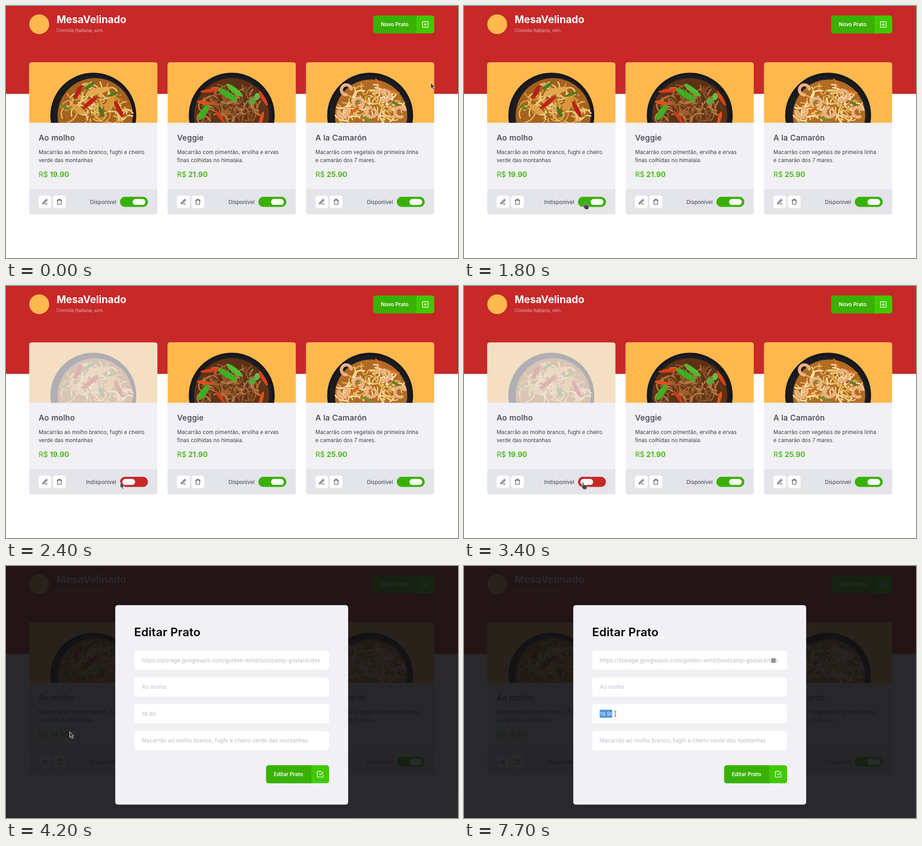
An HTML page for the animation above (8000 ms loop, 1000 by 560 pixels).

```html
<!DOCTYPE html>
<html lang="pt">
<head>
<meta charset="utf-8">
<title>Pratos</title>
<style>
html, body { margin: 0; width: 100%; height: 100%; overflow: hidden; background: #fff; }
svg { display: block; width: 100vw; height: 100vh; }
text { font: 400 11.6px Inter, "Open Sans", sans-serif; letter-spacing: .009em; fill: #3d3d4d; white-space: pre; }
.brand { font-size: 22.4px; font-weight: 700; letter-spacing: 0; fill: #fff; }
.tagline { font: 400 11.2px Roboto, sans-serif; letter-spacing: 0; fill: #fff; opacity: .6; }
.name { font-size: 17.4px; font-weight: 500; letter-spacing: .012em; }
.price { font-size: 16.2px; fill: #39b100; letter-spacing: 0; }
.strong { font-weight: 600; }
.action { font-size: 11.5px; font-weight: 600; fill: #fff; letter-spacing: 0; }
.heading { font-size: 25.6px; font-weight: 600; fill: #000; }
.field { fill: #b7b7cc; letter-spacing: .024em; }
.icon { fill: none; stroke: #3d3d4d; stroke-width: 2; stroke-linecap: round; stroke-linejoin: round; }
.light { stroke: #fff; }
</style>
</head>
<body>
<svg id="stage" viewBox="0 0 1000 560" preserveAspectRatio="none"></svg>
<script>
const LOOP = 8000, STEP = 100;
const GREEN = [57, 177, 0], RED = [199, 40, 40];
const CARD_W = 283.8, CARD_H = 338, PHOTO_H = 134.4, FIELD_YS = [188, 247.7, 307, 366.4];

const icons = {
  plus: '<rect x="3" y="3" width="18" height="18" rx="2"/><path d="M12 8v8M8 12h8"/>',
  check: '<path d="M9 11l3 3L22 4M21 12v7a2 2 0 0 1-2 2H5a2 2 0 0 1-2-2V5a2 2 0 0 1 2-2h11"/>',
  edit: '<path d="M12 20h9M16.5 3.5a2.1 2.1 0 0 1 3 3L7 19l-4 1 1-4z"/>',
  trash: '<path d="M3 6h18M19 6v14a2 2 0 0 1-2 2H7a2 2 0 0 1-2-2V6M8 6V4a2 2 0 0 1 2-2h4a2 2 0 0 1 2 2v2"/>'
};

// Toppings: [x, y, rx, ry, rotation, colour], relative to the plate centre.
const dishes = [
  {
    name: 'Ao molho', price: '19.90', seed: 5, x: 4, r: 83,
    lines: ['Macarrão ao molho branco, fughi e cheiro', 'verde das montanhas'],
    noodles: ['#d89a3c', '#f0cc80', '#a4621e', '#e4b05a'],
    toppings: [
      [-38, -52, 18, 5, -62, '#b8201a'], [-12, -28, 22, 5, -40, '#c4241a'], [52, -14, 20, 5, 62, '#b8201a'],
      [6, -54, 28, 7, -14, '#e2a94e'], [32, -28, 19, 7, -55, '#d9963a'], [-38, -14, 17, 7, 35, '#dba045'],
      [-12, -66, 14, 4, -35, '#4a7d22'], [14, -8, 13, 4, 65, '#3f7a1e'], [-66, -18, 11, 3, 30, '#568a2c'],
      [40, -47, 15, 3, -20, '#4a7d22']
    ]
  },
  {
    name: 'Veggie', price: '21.90', seed: 11, x: 0, r: 83,
    lines: ['Macarrão com pimentão, ervilha e ervas', 'finas colhidas no himalaia.'],
    noodles: ['#8a5128', '#b87a44', '#5e3216', '#a3632f'],
    toppings: [
      [-44, -56, 26, 4, -8, '#d9401a'], [-60, -28, 18, 4, 10, '#e2501c'], [70, -38, 19, 4, 60, '#dc421a'],
      [-25, 4, 18, 4, 55, '#cf3b18'], [66, 6, 15, 4, -75, '#e2501c'],
      [-9, -46, 25, 7, 32, '#3fae22'], [6, -56, 22, 6, 38, '#52bb30'], [-62, -7, 20, 7, -58, '#3fae22'],
      [45, -32, 9, 7, -30, '#5aa83c'], [56, -42, 6, 8, 10, '#6ab84a']
    ]
  },
  {
    name: 'A la Camarón', price: '25.90', seed: 23, x: 2, r: 80,
    lines: ['Macarrão com vegetais de primeira linha', 'e camarão dos 7 mares.'],
    noodles: ['#e3ac50', '#f9e4ae', '#b06c24', '#f2cc80'],
    toppings: [
      [18, -70, 15, 3, 55, '#d9681c'], [46, -53, 18, 3, 10, '#e0741c'], [-38, -10, 15, 3, -45, '#d9681c'],
      [-25, -34, 13, 3, -30, '#73852a'], [55, -26, 13, 3, 30, '#5f7d26'], [-9, 8, 14, 3, 25, '#7a8c30']
    ],
    shrimp: [[-55, -58], [-27, -28], [32, -44], [-62, -6], [0, -7], [63, -8]]
  }
];

// Pointer path: [ms, x, y]
const path = [
  [0, 939.5, 170.5], [100, 952, 176], [900, 217, 351], [1000, 218, 354], [1400, 266, 437], [2000, 266, 437],
  [2400, 253, 436], [3300, 253, 436], [3400, 262, 437], [3600, 262, 437], [4000, 91, 431], [4100, 89, 429],
  [4200, 141, 368], [4300, 168, 309], [4400, 168, 309], [5300, 691, 210], [5400, 338, 268], [5500, 338, 268],
  [5600, 357, 207], [5700, 335, 268], [5800, 335, 268], [6000, 350, 274], [6100, 342, 291], [6500, 322, 329],
  [6600, 322, 329], [6900, 333, 340], [7000, 333, 340], [7500, 333.5, 329], [7600, 333.5, 329], [7700, 334.5, 328.5]
];

const rect = (x, y, w, h, r, fill, extra = '') =>
  `<rect x="${x}" y="${y}" width="${w}" height="${h}" rx="${r}" fill="${fill}" ${extra}/>`;
const text = (x, y, str, cls = '', extra = '') => `<text x="${x}" y="${y}" class="${cls}" ${extra}>${str}</text>`;
const icon = (name, cx, cy, size, cls = '') =>
  `<g class="icon ${cls}" transform="translate(${cx - size / 2} ${cy - size / 2}) scale(${size / 24})">${icons[name]}</g>`;

function random(seed) {
  return () => (seed = (seed * 16807) % 2147483647) / 2147483647;
}

function actionButton(x, y, w, label, glyph) {
  const split = x + w - 39.3;
  return rect(x, y, w, 40, 5.6, '#41c900') +
    `<path d="M${split} ${y}H${x + 5.6}a5.6 5.6 0 0 0 -5.6 5.6v28.8a5.6 5.6 0 0 0 5.6 5.6H${split}z" fill="#39b100"/>` +
    text(x + 16.8, y + 24, label, 'action') + icon(glyph, split + 19.6, y + 20, 16.8, 'light');
}

function food(dish) {
  const next = random(dish.seed * 7919);
  let out = '<circle r="95" fill="#17171b"/><circle r="90" fill="#1d1c21"/>' +
    `<g transform="translate(${dish.x} 0)"><circle r="${dish.r}" fill="${dish.noodles[2]}"/>`;
  for (let i = 0; i < 110; i++) {
    const angle = Math.PI * (1 + next()), dist = dish.r * 0.88 * Math.sqrt(next());
    const turn = next() * 360, bend = 8 + next() * 14;
    out += `<path d="M-15 0Q0 ${-bend} 15 0" fill="none" stroke="${dish.noodles[i % 4]}" stroke-width="3" stroke-linecap="round"
      transform="translate(${dist * Math.cos(angle)} ${dist * Math.sin(angle) + 8}) rotate(${turn})"/>`;
  }
  for (const [x, y, rx, ry, turn, fill] of dish.toppings)
    out += `<ellipse rx="${rx}" ry="${ry}" fill="${fill}" transform="translate(${x} ${y}) rotate(${turn})"/>`;
  (dish.shrimp || []).forEach(([x, y], i) => {
    out += `<path d="M-9 8A11 11 0 1 1 8 8" fill="none" stroke="#eeb083" stroke-width="7" stroke-linecap="round"
      transform="translate(${x} ${y}) rotate(${i * 67 - 50})"/>`;
  });
  return out + '</g>';
}

function card(dish, i) {
  return `<g transform="translate(${51.2 + i * 306.2} 125.2)"><g clip-path="url(#card)">
    ${rect(0, 0, CARD_W, CARD_H, 0, '#f0f0f5')}
    <g id="photo${i}">${rect(0, 0, CARD_W, PHOTO_H, 0, '#ffb84d')}<g transform="translate(142 118)">${food(dish)}</g></g>
    ${rect(0, PHOTO_H, CARD_W, 148, 0, '#f0f0f5')}${rect(0, 282, CARD_W, 56, 0, '#e4e4eb')}</g>
    ${text(21, 174, dish.name, 'name')}
    ${dish.lines.map((line, n) => text(21, 204 + n * 17.6, line)).join('')}
    ${text(21, 255, 'R$', 'price')}${text(45.8, 255, dish.price, 'price strong')}
    ${rect(21, 296, 28, 28, 5.6, '#fff')}${icon('edit', 35, 310, 14)}
    ${rect(53, 296, 28, 28, 5.6, '#fff')}${icon('trash', 67, 310, 14)}
    ${text(192.8, 314.5, 'Disponível', '', `id="status${i}" text-anchor="end"`)}
    ${rect(201, 298.9, 61.8, 22.5, 11.25, `rgb(${GREEN})`, `id="track${i}"`)}
    ${rect(229, 303.5, 28.2, 13.4, 6.7, '#fff', `id="thumb${i}"`)}</g>`;
}

function modal() {
  const values = ['https://storage.googleapis.com/golden-wind/bootcamp-gostack/des', dishes[0].name,
    dishes[0].price, dishes[0].lines.join(' ')];
  return `<g id="modal">${rect(0, 0, 1000, 560, 0, '#121214', 'fill-opacity=".9"')}
    ${rect(241.7, 87, 515.3, 443.2, 5.6, '#f0f0f5')}${text(283.5, 156, 'Editar Prato', 'heading')}
    ${FIELD_YS.map(y => rect(283.6, y, 431.2, 42.6, 5.6, '#fff')).join('')}
    ${rect(300.3, 319.5, 27.7, 17.5, 0, '#4a90d9', 'id="selection"')}
    ${values.map((value, i) => text(300.5, FIELD_YS[i] + 25.6, value, 'field', `id="value${i}"`)).join('')}
    ${rect(329, 261, 1, 16, 0, '#85859a', 'id="caret"')}
    <g id="filler">${rect(680.5, 205, 8.6, 10, 1.5, '#77777f')}
      <path d="M682.5 207.5h4.6M682.5 210h4.6M682.5 212.5h4.6" stroke="#d8d8de"/></g>
    ${actionButton(575.6, 442.8, 139.2, 'Editar Prato', 'check')}</g>`;
}

const pointers = `<g id="pointer" stroke-linejoin="round">
  <path id="arrow" d="M0 0V13.2L3 10.6L5.2 15.4L7.6 14.3L5.5 9.7H9.2Z" fill="#3c3c42" stroke="#fff" stroke-width=".8"/>
  <path id="hand" d="M0 .5C0 -1 2.6 -1 2.8 .5V5C4 4 5 4.3 5.3 5.3C6.5 4.4 7.5 5 7.8 6C9 5.3 10.2 6 10.2 7.2V11L8.8 15H2.3L-2 9.5C-2.5 8 -.8 7 0 8.3Z"
    fill="#46464b" stroke="#fff" stroke-width=".7"/>
  <path id="beam" d="M-2.4 -6H-.6L0 -5.4L.6 -6H2.4M0 -5.4V5.4M-2.4 6H-.6L0 5.4L.6 6H2.4" fill="none" stroke="#3c3c42"/></g>`;

const stage = document.getElementById('stage');
stage.innerHTML = `<defs><clipPath id="card">${rect(0, 0, CARD_W, CARD_H, 5.6, '#000')}</clipPath></defs>
  ${rect(0, 0, 1000, 560, 0, '#fff')}${rect(0, 0, 1000, 195.3, 0, `rgb(${RED})`)}
  <circle cx="73.5" cy="40.5" r="22" fill="#ffb84d"/>
  ${text(112, 38, 'MesaVelinado', 'brand')}${text(112, 58, 'Comida Italiana, sim.', 'tagline')}
  ${actionButton(812.4, 21, 135, 'Novo Prato', 'plus')}
  ${dishes.map(card).join('')}${modal()}${pointers}`;

const $ = id => document.getElementById(id);
const show = (id, on) => $(id).setAttribute('display', on ? 'inline' : 'none');
const clamp = v => Math.min(1, Math.max(0, v));
const smooth = v => v * v * (3 - 2 * v);
const ramp = (t, start, length) => smooth(clamp((t - start) / length));
const mix = (a, b, k) => a + (b - a) * k;

function pointerAt(t) {
  const i = path.findIndex(key => key[0] > t);
  if (i < 0) return path[path.length - 1].slice(1);
  const [t0, x0, y0] = path[i - 1], [t1, x1, y1] = path[i];
  const k = smooth((t - t0) / (t1 - t0));
  return [mix(x0, x1, k), mix(y0, y1, k)];
}

function render(time) {
  const t = Math.floor((time % LOOP) / STEP) * STEP;
  const off = ramp(t, 1800, 300) - ramp(t, 3500, 300);
  $('photo0').setAttribute('opacity', mix(1, 0.3, off));
  $('thumb0').setAttribute('x', mix(229, 206.3, off));
  $('track0').setAttribute('fill', `rgb(${GREEN.map((c, i) => Math.round(mix(c, RED[i], off)))})`);
  $('status0').textContent = t >= 1800 && t < 3500 ? 'Indisponível' : 'Disponível';

  const open = t >= 4200, selected = t >= 7200;
  show('modal', open);
  show('filler', t >= 5200);
  show('caret', t >= 5900 && t < 6400);
  show('selection', selected);
  $('value2').style.fill = selected ? '#fff' : '';

  const [x, y] = pointerAt(t);
  const onField = open && x > 284 && x < 715 && FIELD_YS.some(top => y > top && y < top + 42.6);
  const onSwitch = !open && x > 255 && x < 312 && y > 424 && y < 447;
  show('beam', onField);
  show('hand', onSwitch);
  show('arrow', !onField && !onSwitch);
  $('pointer').setAttribute('transform', `translate(${x} ${y})`);
}

const start = performance.now();
function tick() {
  render(performance.now() - start);
  requestAnimationFrame(tick);
}
tick();
</script>
</body>
</html>
```
